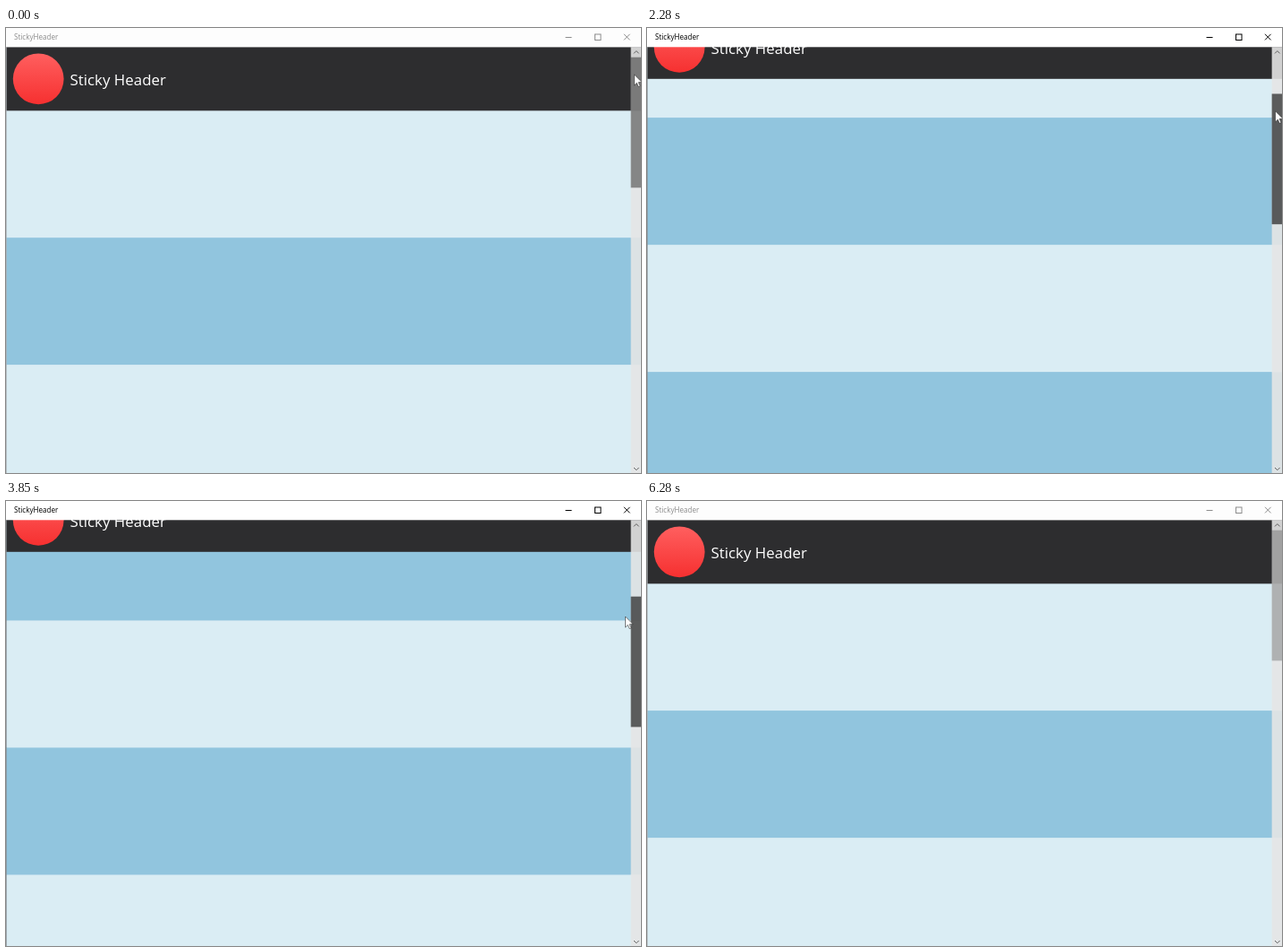
Recreate the animation shown at these times as an HTML page with a canvas. Size 710 by 497 pixels, loop 6300 ms.

```html
<!DOCTYPE html>
<html lang="en">
<head>
<meta charset="utf-8">
<title>StickyHeader</title>
<style>
  html, body { margin: 0; width: 100%; height: 100%; overflow: hidden; background: #fff; }
  canvas { display: block; width: 710px; height: 497px; }
</style>
</head>
<body>
<canvas id="stage" width="710" height="497"></canvas>
<script>
const ctx = document.getElementById('stage').getContext('2d');
const W = 710, H = 497, LOOP = 6300;

// The window is 1000 px wide, shown at 71 %
const SCALE = 0.71;
const TOP = 30 * SCALE, HEADER = 100 * SCALE, BAND = 200 * SCALE;
const BAR = 16 * SCALE, BAR_X = W - BAR, THUMB = 145.7;
const SCROLL_RATIO = 3.28;
const FONT = '"Open Sans", "Noto Sans", sans-serif';

const move = (start, end, to) => ({ start, end, to });

// Runs eased moves one after another, each from where the last one ended
function follow(value, moves, t) {
  for (const { start, end, to } of moves) {
    const u = Math.min(1, Math.max(0, (t - start) / (end - start)));
    value += (to - value) * u * u * (3 - 2 * u);
  }
  return value;
}

const drags = [
  move(1020, 1630, 140), move(1670, 1940, 175), move(2130, 2610, 0),
  move(3200, 3950, 255), move(4230, 4608, 0)
];
const driftX = [
  move(2610, 2800, 706.5), move(3140, 3850, 692), move(4230, 4580, 698), move(4880, 5160, 714)
];
// Hand offset from the grabbed point on the thumb
const driftY = [
  move(2610, 2800, -15), move(3140, 3850, 3), move(4230, 4600, -6), move(4880, 5160, -22)
];
const thumbFade = [move(780, 830, 0.6), move(4880, 5160, 0.23)];

function rect(color, x, y, w, h) {
  ctx.fillStyle = color;
  ctx.fillRect(x, y, w, h);
}

function path(points, close) {
  ctx.beginPath();
  points.forEach(([x, y]) => ctx.lineTo(x, y));
  if (close) ctx.closePath();
}

function line(color, ...points) {
  path(points);
  ctx.strokeStyle = color;
  ctx.lineWidth = 1;
  ctx.stroke();
}

function text(str, x, y, size, color) {
  ctx.font = `${size}px ${FONT}`;
  ctx.fillStyle = color;
  ctx.fillText(str, x, y);
}

function drawBands(scroll) {
  for (let i = 0; i < 6; i++) {
    const y = TOP + HEADER + i * BAND - scroll;
    rect(i % 2 ? '#91c5de' : '#daedf4', 0, y, W, BAND);
  }
}

// The header moves at half speed and sticks at half its height
function drawHeader(scroll) {
  const y = TOP - Math.min(scroll, HEADER) / 2;
  const r = 40 * SCALE, cy = y + HEADER / 2;
  rect('#2d2d2f', 0, y, W, HEADER);
  const fill = ctx.createLinearGradient(0, cy - r, 0, cy + r);
  fill.addColorStop(0, '#ff5f5f');
  fill.addColorStop(1, '#f63030');
  ctx.fillStyle = fill;
  ctx.beginPath();
  ctx.arc(36.2, cy, r, 0, Math.PI * 2);
  ctx.fill();
  text('Sticky Header', 71.5, y + 43.1, 16.9, '#fff');
}

function chevron(y, dir) {
  line('#606060', [702, y], [704.8, y + 2.8 * dir], [707.6, y]);
}

function drawScrollbar(scroll, shade) {
  rect('rgba(230,230,230,0.89)', BAR_X, TOP, BAR, H - TOP);
  rect(`rgba(0,0,0,${shade})`, BAR_X, TOP + BAR + scroll / SCROLL_RATIO, BAR, THUMB);
  chevron(28.4, -1);
  chevron(491, 1);
}

function drawTitleBar(active) {
  const ink = active ? '#000' : '#8c8c8c';
  rect(active ? '#fff' : '#fdfdfd', 0, 0, W, TOP);
  text('StickyHeader', 9, 12.9, 8.1, ink);
  line(ink, [625.5, 10.5], [632.5, 10.5]);
  ctx.strokeRect(658.5, 7, 6.5, 6.5);
  line(ink, [691, 6.8], [697.6, 13.4]);
  line(ink, [697.6, 6.8], [691, 13.4]);
}

function outline(points) {
  path(points, true);
  ctx.fillStyle = '#fff';
  ctx.fill();
  ctx.strokeStyle = '#222';
  ctx.lineWidth = 0.8;
  ctx.stroke();
}

function drawPointer(x, y) {
  ctx.save();
  ctx.translate(x + 0.5, y);
  ctx.scale(SCALE, SCALE);
  outline([[0, 0], [0, 17], [4, 13.2], [6.6, 19.2], [9.2, 18], [6.6, 12.2], [12, 12]]);
  ctx.restore();
}

// Left half of a resize arrow; the rest lies outside the window
function drawResize(x, y) {
  const upper = [[11, -1.3], [6.5, -1.3], [6.5, -4.3], [11, 0]];
  const lower = upper.slice(0, 3).reverse().map(([a, b]) => [a, -b]);
  outline([...upper, ...lower].map(([a, b]) => [x - a + (a === 11 && b ? 11 : 0), y + b]));
}

function draw(t) {
  const active = t >= 780 && t < 6280;
  const scroll = follow(0, drags, t);
  drawBands(scroll);
  drawHeader(scroll);
  drawScrollbar(scroll, follow(0.42, thumbFade, t));
  rect(active ? '#858c90' : '#a8adb0', 0, TOP, SCALE, H - TOP);
  drawTitleBar(active);
  if (t < 5160) {
    drawPointer(follow(702, driftX, t), 52 + scroll / SCROLL_RATIO + follow(0, driftY, t));
  }
  if (t >= 5720 && t < 5750) drawResize(712.5, 445.5);
}

const start = performance.now();
function tick() {
  draw((performance.now() - start) % LOOP);
  requestAnimationFrame(tick);
}
tick();
</script>
</body>
</html>
```
